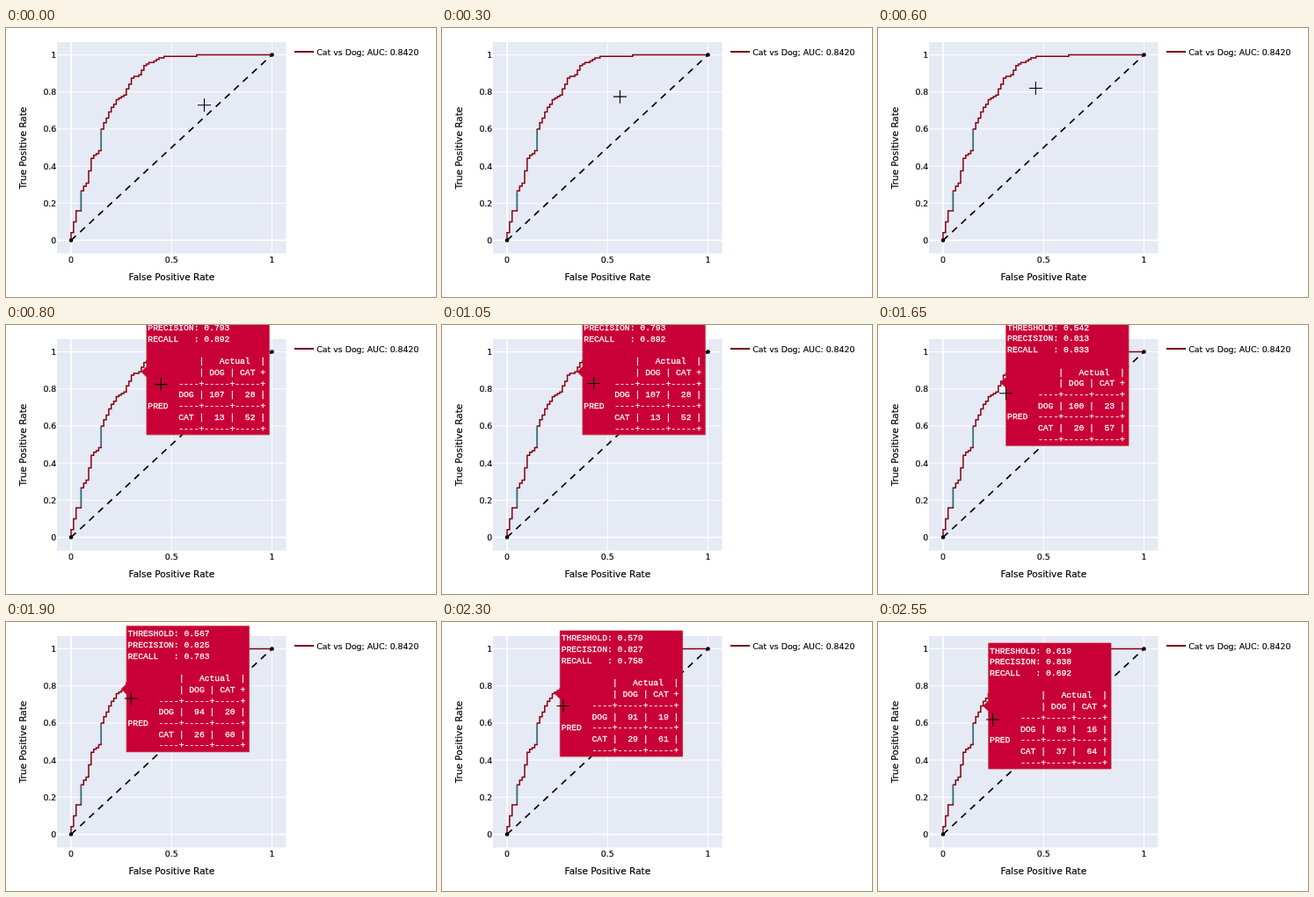
These frames come from a looping animation (489 by 306 pixels, 2600 ms). An HTML page:

```html
<!DOCTYPE html>
<html lang="en">
<head>
<meta charset="utf-8">
<title>ROC curve hover</title>
<style>
  html, body { margin: 0; width: 100%; height: 100%; overflow: hidden; background: #fff; }
  svg { display: block; }
  text { font-family: "DejaVu Sans", sans-serif; font-size: 9.4px; fill: #000; stroke: #000; stroke-width: .15; }
  .title { font-size: 10.5px; text-anchor: middle; }
  .mid { text-anchor: middle; }
  .end { text-anchor: end; }
  .grid path { stroke: #fff; stroke-width: 1; }
  .grid .zero { stroke-width: 1.7; }
  .roc { fill: none; stroke: #86000f; stroke-width: 1.5; }
  .cool { stroke: #1f7f8a; stroke-width: 1.4; }
  #tip path { fill: #c90038; stroke: #c42a2c; stroke-width: .8; }
  #tip text {
    font-family: "Liberation Mono", monospace; font-size: 9.7px;
    fill: #fff; stroke: #fff; stroke-width: .3; white-space: pre;
  }
</style>
</head>
<body>
<svg width="489" height="306" viewBox="0 0 489 306">
  <rect x="58" y="16" width="260.5" height="240.5" fill="#e5eaf5"/>
  <g id="grid" class="grid"></g>
  <path id="curve" class="roc"/>
  <path class="cool" d="M85.4 186V207M108.3 116V138.5"/>
  <path d="M74 241.5L302.5 30.5" stroke="#000" stroke-width="1.7" stroke-dasharray="7.5 6.5"/>
  <circle cx="74" cy="241.5" r="2.3"/>
  <circle cx="302.5" cy="30.5" r="2.3"/>
  <g id="ticks"></g>
  <text class="title" x="188.4" y="287.3">False Positive Rate</text>
  <text class="title" transform="translate(22.6 136.5) rotate(-90)">True Positive Rate</text>
  <path d="M328 27H350" stroke="#74000f" stroke-width="2"/>
  <text x="353.3" y="30.6">Cat vs Dog; AUC: 0.8420</text>
  <g id="tip">
    <path d="M0 0L6 -6V-71.5H145.3V71.5H6V6Z"/>
    <g id="rows"></g>
  </g>
  <path id="cross" d="M-7.5 0H7.5M0 -7.5V7.5" stroke="#000" stroke-width="1.1"/>
</svg>
<script>
const $ = id => document.getElementById(id);
const LOOP = 2600, STEP = 50, TIP_FROM = 750;
const POS = 120, NEG = 80;
const px = fp => 74 + 228.5 * fp / NEG;
const py = tp => 241.5 - 211 * tp / POS;

// Linear interpolation between rows, by their first column
function between(rows, at) {
  const i = rows.findIndex(r => r[0] >= at);
  if (i < 1) return rows[i < 0 ? rows.length - 1 : 0];
  const a = rows[i - 1], b = rows[i];
  const k = (at - a[0]) / (b[0] - a[0]);
  return a.map((v, n) => v + (b[n] - v) * k);
}

// Key levels of the curve: false positives, true positives
const levels = [
  [0, 5], [2, 19], [3, 19], [4, 32], [6, 37], [8, 53], [11, 58], [12, 72], [15, 83],
  [18, 91], [21, 94], [24, 105], [27, 107], [29, 113], [37, 119], [49, 119], [50, 120]
];
let curve = `M${px(0)} ${py(0)}`;
for (let fp = 0; fp < NEG; fp++) {
  curve += `V${py(Math.round(between(levels, fp)[1]))}H${px(fp + 1)}`;
}
$("curve").setAttribute("d", curve);

let grid = "", ticks = "";
const zero = v => v ? "" : "zero";
for (const v of [0, 0.5, 1]) {
  const x = px(v * NEG);
  grid += `<path class="${zero(v)}" d="M${x} 16V256.5"/>`;
  ticks += `<text class="mid" x="${x}" y="266.7">${v}</text>`;
}
for (const v of [0, 0.2, 0.4, 0.6, 0.8, 1]) {
  const y = py(v * POS);
  grid += `<path class="${zero(v)}" d="M58 ${y}H318.5"/>`;
  ticks += `<text class="end" x="57.3" y="${y + 3.4}">${v}</text>`;
}
$("grid").innerHTML = grid;
$("ticks").innerHTML = ticks;

// Time, pointer x and y, then the hovered point: fp, tp, threshold
const keys = [
  [0, 225.5, 87.8, 28, 107, 0.497],
  [600, 179.3, 68.5, 28, 107, 0.497],
  [1050, 172.5, 66.5, 28, 107, 0.497],
  [1400, 148.8, 68.5, 25, 105, 0.518],
  [1900, 142.3, 87, 20, 94, 0.567],
  [2300, 138, 95.5, 19, 91, 0.579],
  [2550, 130.5, 111, 16, 83, 0.619]
];

function report(fp, tp, cut) {
  const rule = "----+-----+-----+";
  const cells = (name, ...counts) =>
    `      ${name} |` + counts.map(n => ` ${String(n).padStart(3)} |`).join("");
  return [
    "THRESHOLD: " + cut.toFixed(3),
    "PRECISION: " + (tp / (tp + fp)).toFixed(3),
    "RECALL   : " + (tp / POS).toFixed(3),
    "",
    "          |   Actual  |",
    "          | DOG | CAT +",
    "      " + rule,
    cells("DOG", tp, fp),
    "PRED  " + rule,
    cells("CAT", POS - tp, NEG - fp),
    "      " + rule
  ];
}

const place = (el, x, y) => el.setAttribute("transform", `translate(${x} ${y})`);

function draw(t) {
  const [, x, y, f, p, cut] = between(keys, t);
  const fp = Math.round(f), tp = Math.round(p);
  place($("cross"), x, y);
  place($("tip"), px(fp), py(tp));
  $("tip").style.display = t < TIP_FROM ? "none" : "";
  $("rows").innerHTML = report(fp, tp, cut)
    .map((s, i) => `<text x="7.4" y="${(i - 5) * 12.72 + 3.6}">${s}</text>`).join("");
}

const start = performance.now();
let last = -1;
function tick() {
  const t = Math.floor((performance.now() - start) % LOOP / STEP) * STEP;
  if (t !== last) draw(last = t);
  requestAnimationFrame(tick);
}
tick();
</script>
</body>
</html>
```
